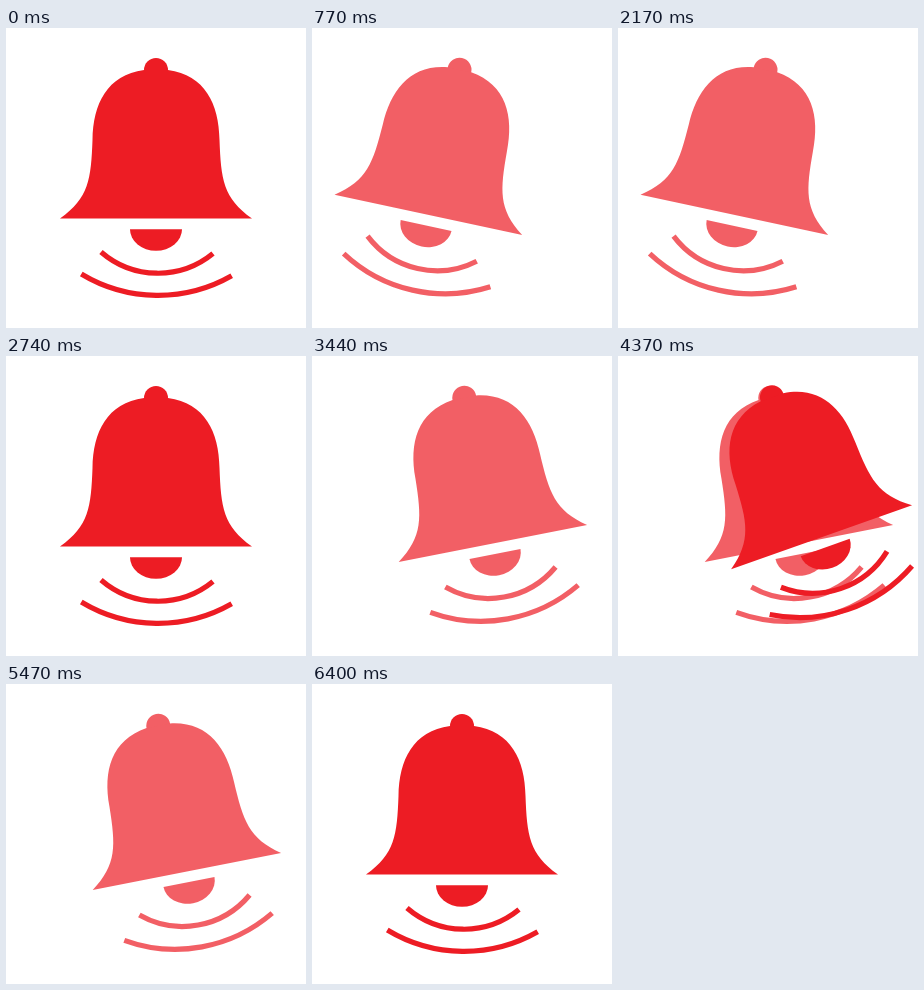
An HTML page for the animation above (7.7 s loop, 300 px wide and 300 px high).

```html
<!DOCTYPE html>
<html lang="en">
<head>
<meta charset="utf-8">
<title>Ringing bell</title>
<style>
  html, body { margin: 0; width: 100%; height: 100%; overflow: hidden; background: #fff; }
  svg { display: block; width: 100%; height: 100%; }
</style>
</head>
<body>
<svg viewBox="0 0 300 300">
  <defs>
    <g id="bell" fill="#ed1c24">
      <circle cx="150" cy="42" r="12"/>
      <path d="M54 190.5C83 170 85 151 86.5 112C87 76 101 47 138 42H162C199 47 213 76 213.5 112C215 151 217 170 246 190.5Z"/>
      <path d="M124 201.3H176A26 21.5 0 0 1 124 201.3Z"/>
      <g fill="none" stroke="#ed1c24" stroke-width="5.2">
        <path d="M95 224A87 87 0 0 0 207 225.6"/>
        <path d="M75.3 246A148.5 148.5 0 0 0 225.7 247.8"/>
      </g>
    </g>
  </defs>
  <g id="stage"></g>
</svg>
<script>
const LOOP = 7700;

// Swing angle and opacity of each pose.
const poses = {
  left: [12.1, 0.7],
  farLeft: [19.2, 1],
  right: [-11.1, 0.7],
  farRight: [-19.5, 1],
  rest: [0, 1]
};

// Start time in ms and the poses visible from then on.
const timeline = [
  [0, 'rest'],
  [600, 'rest left'],
  [770, 'left'],
  [1200, 'left farLeft'],
  [1370, 'farLeft'],
  [1740, 'left farLeft'],
  [2170, 'left'],
  [2540, 'left rest'],
  [2740, 'rest'],
  [3440, 'right'],
  [4370, 'right farRight'],
  [4470, 'farRight'],
  [5100, 'right farRight'],
  [5470, 'right'],
  [6400, 'rest']
].map(([start, names]) => [start, names.split(' ')]);

const stage = document.getElementById('stage');
const bells = {};
for (const [name, [angle, opacity]] of Object.entries(poses)) {
  const bell = document.createElementNS('http://www.w3.org/2000/svg', 'use');
  bell.setAttribute('href', '#bell');
  bell.setAttribute('transform', `rotate(${angle} 150 30)`);
  bell.setAttribute('opacity', opacity);
  bells[name] = stage.appendChild(bell);
}

function render(time) {
  const [, visible] = timeline.findLast(([start]) => start <= time);
  for (const name in bells) {
    bells[name].setAttribute('visibility', visible.includes(name) ? 'visible' : 'hidden');
  }
}

const begin = performance.now();
function tick() {
  render((performance.now() - begin) % LOOP);
  requestAnimationFrame(tick);
}
tick();
</script>
</body>
</html>
```
